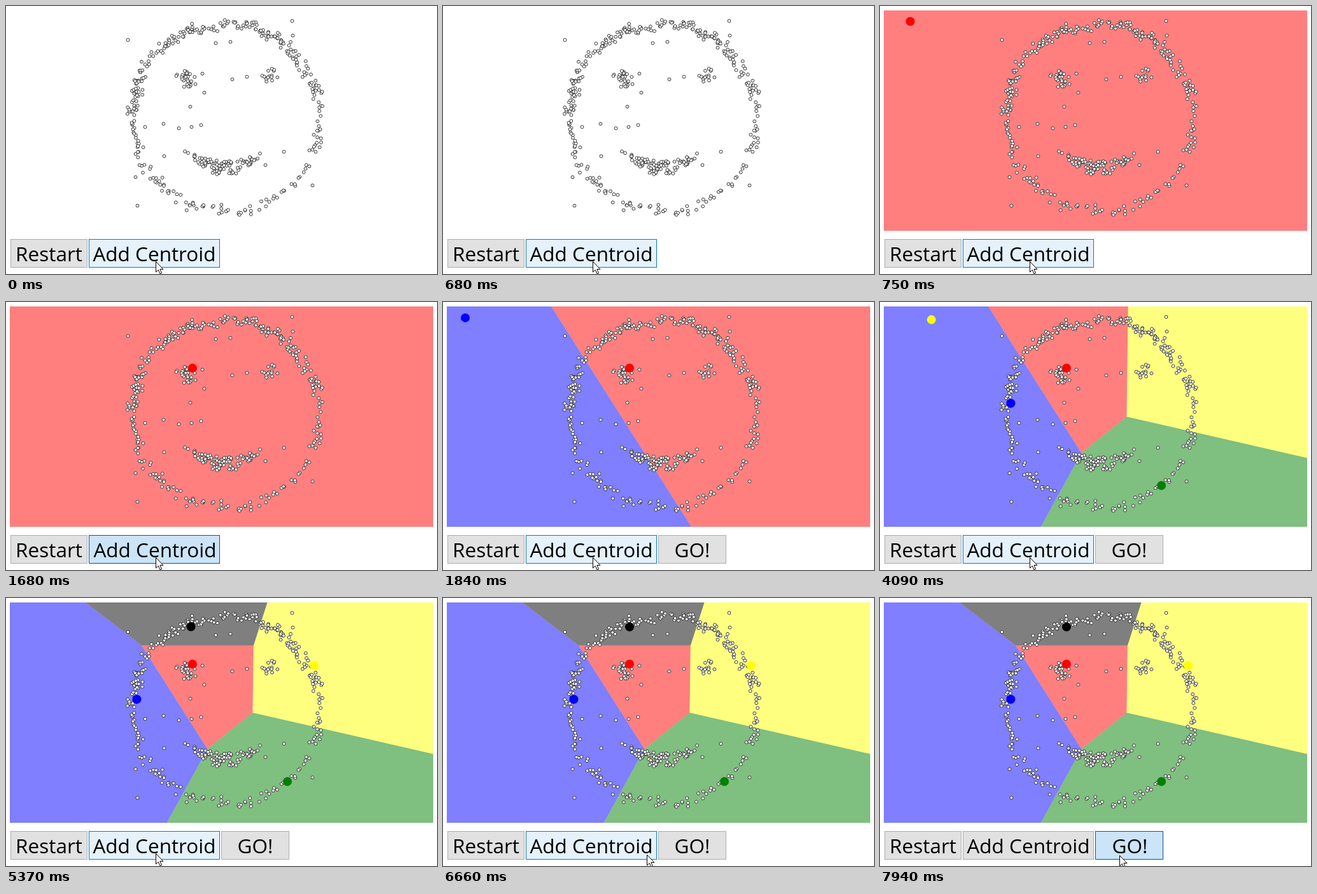
Write an HTML page that moves like this. It is 677 by 422 pixels and loops after 8 s.

```html
<!DOCTYPE html>
<html lang="en">
<head>
<meta charset="utf-8">
<title>Centroids</title>
<style>
  html, body { margin: 0; width: 100%; height: 100%; overflow: hidden; background: #fff; }
  svg { display: block; width: 677px; height: 422px; }
  text { font: 31.5px "Open Sans", "Noto Sans", sans-serif; text-anchor: middle; }
</style>
</head>
<body>
<svg id="stage" viewBox="0 0 677 422"></svg>
<script>
const LOOP = 8000;
const TICK = 85; // the picture is redrawn in steps of this length
const DOT_START = [25, 17];
const DOT_MOVE = 250;
const CURSOR = { start: 6220, move: 900, from: [236, 402], to: [377, 405] };
const GO_PRESS = 7760;
const BOX = [[6, 7], [671, 7], [671, 354], [6, 354]];
const stage = document.getElementById('stage');

function add(parent, tag, attrs = {}) {
  const el = document.createElementNS('http://www.w3.org/2000/svg', tag);
  for (const key in attrs) el.setAttribute(key, attrs[key]);
  return parent.appendChild(el);
}
const mix = (a, b, p) => a + (b - a) * p;
const clamp = t => Math.min(1, Math.max(0, t));
const cubicInOut = t => t < 0.5 ? 4 * t ** 3 : 1 - 4 * (1 - t) ** 3;
const sineInOut = t => (1 - Math.cos(Math.PI * t)) / 2;
const sinceTick = (t, start) => Math.floor((t - start) / TICK) * TICK;

// press: button goes down; show: dot first drawn; lead: time it has moved by then
const centroids = [
  { color: 'red', at: [293, 104], press: 500, show: 750, lead: 69 },
  { color: 'blue', at: [205.5, 159.5], press: 1680, show: 1840, lead: 60 },
  { color: 'green', at: [442, 289], press: 2730, show: 2900, lead: 40 },
  { color: 'yellow', at: [484, 106.5], press: 3820, show: 4090, lead: 78 },
  { color: 'black', at: [293, 45.5], press: 5010, show: 5150, lead: 47 }
];
const isHeld = (c, t) => t >= c.press && t < Math.min(c.show, c.press + 175);

// Keep the part of a polygon that lies nearer to a than to b.
function nearer(poly, a, b) {
  const side = p => (p[0] - (a[0] + b[0]) / 2) * (b[0] - a[0]) + (p[1] - (a[1] + b[1]) / 2) * (b[1] - a[1]);
  return poly.flatMap((p, i) => {
    const q = poly[(i + 1) % poly.length], sp = side(p), sq = side(q);
    const out = sp <= 0 ? [p] : [];
    if (sp * sq < 0) out.push([0, 1].map(k => mix(p[k], q[k], sp / (sp - sq))));
    return out;
  });
}
const cell = (own, shown) => shown.reduce(
  (poly, c) => c === own ? poly : nearer(poly, own.at, c.at), BOX).join(' ');

let seed = 29;
function random() {
  seed = (seed * 16807) % 2147483647;
  return seed / 2147483647;
}
const jitter = size => (random() + random() - 1) * size;

function smiley() {
  const points = [];
  // Outline: clumps around a circle, thickest at the upper left
  const clumps = 48;
  for (let i = 0; i < clumps; i++) {
    const middle = i / clumps * 2 * Math.PI;
    const count = (3 + 8 * random()) * (1 + 0.4 * Math.cos(middle - 4.2));
    const radius = 148 + jitter(5);
    for (let j = 0; j < count; j++) {
      const angle = middle + jitter(0.09), r = radius + jitter(10);
      points.push([345 + r * Math.cos(angle), 176 + r * Math.sin(angle)]);
    }
  }
  const eye = (x, y, count) => {
    for (let i = 0; i < count; i++) points.push([x + jitter(17), y + jitter(20)]);
  };
  eye(283, 112, 28);
  eye(410, 112, 15);
  // Mouth: a filled crescent
  for (let i = 0; i < 92; i++) {
    const p = 0.5 + jitter(0.5), bend = Math.sin(Math.PI * p);
    points.push([mix(280, 408, p), 228 + 39 * bend - 24 * random() * bend]);
  }
  // Strays
  points.push([191, 53], [449, 23], [450, 46], [329, 58], [352, 56], [308, 106], [355, 115],
    [378, 111], [311, 136], [289, 158], [306, 187], [291, 190], [271, 192], [247, 185],
    [218, 190], [248, 236], [436, 229], [407, 250], [481, 282], [203, 269], [206, 314]);
  return points;
}

const cells = add(stage, 'g', { 'fill-opacity': 0.5 });
const dust = add(stage, 'g', { fill: '#fff', stroke: '#333' });
for (const [x, y] of smiley()) add(dust, 'circle', { cx: x + 0.5, cy: y + 0.5, r: 2.4 });
const dots = add(stage, 'g');
for (const c of centroids) {
  c.cell = add(cells, 'polygon', { fill: c.color });
  c.dot = add(dots, 'circle', { r: 7, fill: c.color });
}

const LOOK = {
  normal: ['#e1e1e1', '#adadad'],
  focused: ['#e1e1e1', '#0078d7'],
  hover: ['#e5f1fb', '#0078d7'],
  pressed: ['#cce4f7', '#005499']
};
function button(x, width, label) {
  const g = add(stage, 'g');
  const rect = add(g, 'rect', { x: x + 0.5, y: 367.5, width: width - 1, height: 44 });
  const text = add(g, 'text', { y: 402 });
  text.textContent = label;
  const set = look => {
    rect.setAttribute('fill', LOOK[look][0]);
    rect.setAttribute('stroke', LOOK[look][1]);
    text.setAttribute('x', x + width / 2 + (look === 'pressed' ? 1 : 0));
  };
  set('normal');
  return { g, set };
}
button(7, 121, 'Restart');
const addButton = button(130, 206, 'Add Centroid');
const go = button(338, 107, 'GO!');
const cursor = add(stage, 'path', {
  d: 'M0 0V16.5L3.8 13L6.5 19.2L9 18.1L6.4 12H11.5Z', fill: '#fff', stroke: '#000'
});

function cursorAt(t) {
  const p = sineInOut(clamp((sinceTick(t, CURSOR.start) + TICK) / CURSOR.move));
  return CURSOR.from.map((from, k) => Math.round(mix(from, CURSOR.to[k], p)));
}

function draw(t) {
  const shown = centroids.filter(c => t >= c.show);
  for (const c of centroids) {
    const visible = shown.includes(c);
    c.cell.style.display = c.dot.style.display = visible ? '' : 'none';
    if (!visible) continue;
    const p = cubicInOut(clamp((sinceTick(t, c.show) + c.lead) / DOT_MOVE));
    c.dot.setAttribute('cx', mix(DOT_START[0], c.at[0], p));
    c.dot.setAttribute('cy', mix(DOT_START[1], c.at[1], p));
    c.cell.setAttribute('points', cell(c, shown));
  }

  const [x, y] = cursorAt(t);
  const goDown = t >= GO_PRESS;
  const addDown = centroids.some(c => isHeld(c, t));
  cursor.setAttribute('transform', `translate(${x - 0.5} ${y + 0.5})`);
  addButton.set(addDown ? 'pressed' : x < 336 ? 'hover' : goDown ? 'normal' : 'focused');
  go.g.style.display = shown.length > 1 ? '' : 'none';
  go.set(goDown ? 'pressed' : x >= 338 ? 'hover' : 'normal');
}

const begin = performance.now();
function frame() {
  draw((performance.now() - begin) % LOOP);
  requestAnimationFrame(frame);
}
frame();
</script>
</body>
</html>
```
